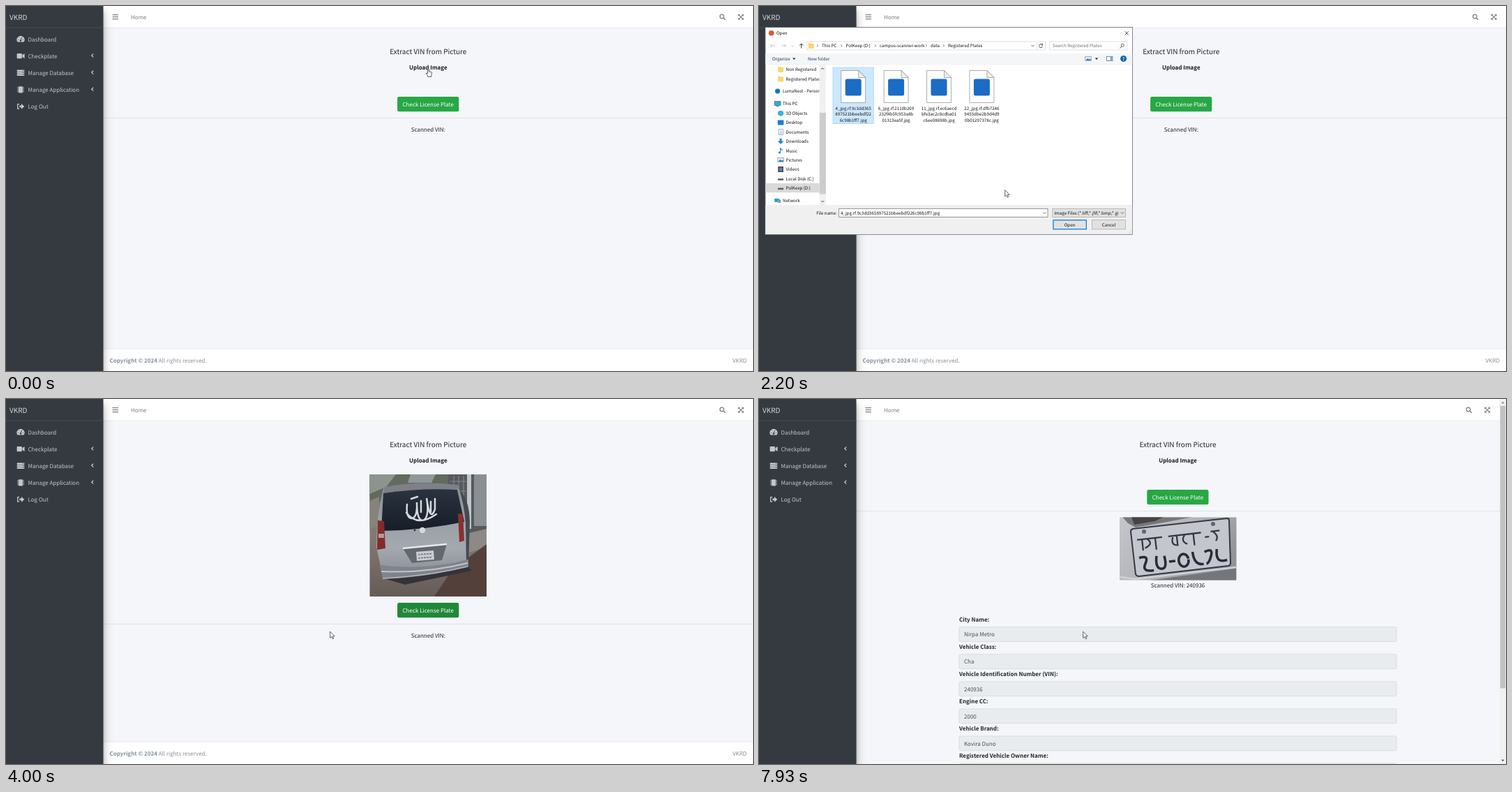
An HTML page that plays this animation: 1071 by 523 pixels, repeating every 8 s.

```html
<!DOCTYPE html>
<html lang="en">
<head>
<meta charset="utf-8">
<title>Plate check</title>
<style>
html, body { margin: 0; width: 100%; height: 100%; overflow: hidden; background: #f4f6f9; }
#stage { display: block; width: 100%; height: 100%; }
text {
  font-family: "Noto Sans CJK JP", "Noto Sans CJK SC", "Noto Sans", sans-serif;
  text-rendering: geometricPrecision;
  white-space: pre;
}
</style>
</head>
<body>
<svg id="stage" viewBox="0 0 1071 523" xmlns="http://www.w3.org/2000/svg"></svg>
<script>
const BRAND = "VKRD", OWNER = "Tahvan Ozrab", PLATE = "240936";
const FRAME = 1000 / 15, LOOP = 8000;

// ---- drawing helpers ----
const text = (x, y, s, { size = 8, fill = "#212529", bold = 400, at = "start" } = {}) =>
  `<text x="${x}" y="${y}" font-size="${size}" fill="${fill}" font-weight="${bold}" text-anchor="${at}">${s}</text>`;
const rect = (x, y, w, h, fill, extra = "") =>
  `<rect x="${x}" y="${y}" width="${w}" height="${h}" fill="${fill}" ${extra}/>`;
const shape = (d, fill, extra = "") => `<path d="${d}" fill="${fill}" ${extra}/>`;
const line = (d, color, w = 1, extra = "") =>
  `<path d="${d}" fill="none" stroke="${color}" stroke-width="${w}" ${extra}/>`;
const disc = (x, y, r, fill, extra = "") => `<circle cx="${x}" cy="${y}" r="${r}" fill="${fill}" ${extra}/>`;
const at = (x, y, s) => `<g transform="translate(${x} ${y})">${s}</g>`;
const crop = (x, y, w, h, s, dx = 0) =>
  `<svg x="${x + dx}" y="${y}" width="${w}" height="${h}" viewBox="${x} ${y} ${w} ${h}">${s}</svg>`;
const chevron = (x, y, color = "#444") => line(`M${x - 2} ${y - 1}l2 2l2 -2`, color, .8);
const button = (x, y, w, label, fill, id = "") =>
  rect(x, y, w, 21.2, fill, `rx="2.2" ${id && `id="${id}"`}`) +
  text(x + w / 2, y + 13.7, label, { fill: "#fff", at: "middle" });
const fade = (id, stops, x2 = 0, y2 = 1) =>
  `<linearGradient id="${id}" x2="${x2}" y2="${y2}">` +
  stops.map((c, i) => `<stop offset="${i / (stops.length - 1)}" stop-color="${c}"/>`).join("") + `</linearGradient>`;

// ---- sidebar ----
const DARK = "#343a40", PALE = "#c2c7d0";
const menu = [
  ["Dashboard", shape("M-4.6 4a5.5 5.5 0 1 1 9.2 0z", PALE) + line("M0 2L1.7 -2.6M-3.6 1h1M-2.3 -2.3l.6 .6M2.7 1h1", DARK, .9) + disc(0, 2, 1.2, DARK)],
  ["Checkplate", rect(-5.4, -3.6, 7.3, 7.2, PALE, 'rx="1"') + shape("M2.4 -1.5L5.6 -3.4V3.4L2.4 1.5z", PALE)],
  ["Manage Database", [-4.3, -1.3, 1.7].map(y => rect(-5.3, y, 10.6, 2.5, PALE, 'rx=".6"') + disc(3.6, y + 1.2, .5, DARK)).join("")],
  ["Manage Application", rect(-2.9, -4.6, 5.8, 9.2, PALE, 'rx=".7"') + line("M-4 -3.6V4M4 -3.6V4", PALE, 1.6, 'stroke-dasharray="1 1"')],
  ["Log Out", shape("M-1.6 -1.3H1V-3.8L5.3 0L1 3.8V1.3H-1.6z", PALE) + line("M-1.8 -3.3H-4.3V3.3H-1.8", PALE, 1.3)]
].map(([label, icon], i) => {
  const y = 47.5 + 24.1 * i;
  return at(21, y, icon) + text(31.5, y + 3.1, label, { fill: PALE }) +
    (i > 0 && i < 4 ? line(`M125.2 ${y - 3}l-2.4 2.4l2.4 2.4`, PALE, 1.3) : "");
}).join("");

const shadow = (y, blur, alpha) => rect(-40, y, 179.5, 720, "#000", `opacity="${alpha}" style="filter:blur(${blur}px)"`);
const sidebar =
  `<g class="scroll">${shadow(7.8, 7.8, .25)}${shadow(5.6, 2.8, .22)}</g>` + rect(0, 0, 139.5, 523, DARK) +
  `<g class="scroll">${text(5, 19.7, BRAND, { size: 10, fill: "#d6d8d9", bold: 300 })}${line("M0 31.2H139.5", "#4b545c", .7)}${menu}</g>`;

// ---- photos ----
const van = crop(521.5, 108, 167.5, 175,
  rect(521, 108, 168, 175, "url(#ground)") +
  rect(521, 108, 120, 40, "#626a5e") + shape("M521 108h38l-14 18l-24 10z", "#8d948d") +
  shape("M580 108h36l-6 12h-34z", "#8f9896") + shape("M521 146l14 -6v40l-14 8z", "#85837b") +
  rect(634, 108, 55, 100, "#565a5e") + rect(661, 108, 6, 78, "#c3c6c8") +
  line("M642 110V150M649 110V160M656 110V165M636 118H660M636 132H660", "#80868a", 1.2) +
  rect(671, 108, 18, 74, "#898f93") +
  shape("M664 192l25 -6v26l-25 8z", "#8c8986") +
  shape("M640 244l49 -36v75h-75z", "#54403a") +
  shape("M538 256l122 -18l8 8l-96 20z", "#35333a") +
  shape("M648 130Q664 140 665 176L663 234L652 240z", "#434a53") +
  shape("M541 128Q590 118 648 124Q657 150 659 178L660 236L541 258L531 212Q531 166 541 128z", "url(#body)") +
  shape("M543 126Q592 117 647 123L649 129L541 136z", "#7d8187") +
  shape("M541 135Q596 127 647 130L657 176Q600 188 538 189z", "url(#glass)") +
  shape("M533 174l9 1l2 39l-12 2z", "#832b2b") + rect(534, 193, 8, 6, "#b59a98") +
  shape("M648 164l7 1l2 38l-7 2z", "#8a302f") +
  line("M575 151Q573 172 583 171Q590 168 589 148Q589 178 600 173Q607 166 603 142Q608 178 615 158V143M574 163Q590 184 617 165M581 143l9 -3M595 146V162M609 147V162", "#d5d9de", 2.5, 'stroke-linecap="round"') +
  disc(597, 188, 4.2, "#d6d9dc") + disc(586, 188, 1.4, "#30343a") +
  shape("M569 214L632 208L625 231L582 235z", "#626770") + line("M569 214L632 208", "#e7e9eb", 2.5) +
  shape("M588 219l25 -2l1 13l-25 2z", "#c9ccd0") + line("M591 223l20 -1.5M591 228l20 -1.5", "#777b82", 1.7, 'stroke-dasharray="3 1"') +
  shape("M536 238Q600 246 663 230V240Q602 256 540 258z", "#7f848c") +
  line("M538 247Q604 250 662 235", "#c1c5c9", 2) + line("M540 257Q604 254 662 240", "#b1b5ba", 1.5), -605.3);

const plate = crop(517, 169.5, 167.5, 90,
  rect(517, 169, 168, 91, "url(#metal)") +
  shape("M521 169H622L580 177L540 184L529 178z", "#77777a") + shape("M534 169h46l-12 6l-30 5z", "#454344") +
  shape("M560 260L684 243V260z", "#74767c") + line("M517 255L540 258L684 241", "#d0d2d6", 2.5) +
  shape("M536 186L671 171Q674 171 674 174L676 235Q676 238 673 239L545 254Q541 254 540 251L533 190Q533 187 536 186z", "#c3c6cd", 'stroke="#353944" stroke-width="2"') +
  disc(552, 190, 3, "#60646c") + disc(651, 179, 3, "#60646c") +
  `<g transform="rotate(-6.5 604 215)">` +
  line("M544 195H580M589 195H636M641 202H647M650 195H663M551 195v16M558 195q10 8 -4 13M570 195v17M596 195q-6 13 5 14V195M613 195q-8 9 2 14M625 195v17M653 195q9 8 3 14", "#343844", 2.3) +
  line("M544 221q15 -3 8 9t11 11M569 221q-4 18 5 19t6 -18M586 231H595M614 231a7 9 0 1 1 -.1 -1M621 221q0 20 14 19M638 223q13 -5 9 6t-8 11M656 221q-5 21 13 17", "#282c37", 3.6) +
  `</g>`, -600.5);

// ---- page ----
const fields = [
  ["City Name:", "Nirpa Metro"], ["Vehicle Class:", "Cha"],
  ["Vehicle Identification Number (VIN):", PLATE], ["Engine CC:", "2000"],
  ["Vehicle Brand:", "Kovira Duno"], ["Registered Vehicle Owner Name:", OWNER],
  ["Registered Vehicle Owner ID:", "c482a917-5e63-41b8-92dc-e7aa4193d06f"]
].map(([label, value], i) => {
  const y = 326.8 + 39.05 * i;
  return text(287, y - 8.1, label, { bold: 700 }) +
    rect(287, y, 627, 20.8, "#e9ecef", 'rx="2" stroke="#ced4da" stroke-width=".7"') +
    text(294, y + 13.6, value, { fill: "#495057" });
}).join("");

const GREY = "#7f7f7f";
const corner = shape("M-4 -4h3.2l-3.2 3.2z", GREY);
const tools =
  at(1027, 15.6, disc(-.6, -.6, 2.8, "none", `stroke="${GREY}" stroke-width="1.3"`) + line("M1.4 1.4L4.2 4.2", GREY, 1.5)) +
  at(1053.6, 15.7, line("M-2.6 -2.6L2.6 2.6M2.6 -2.6L-2.6 2.6", GREY, 1.2) +
    [0, 90, 180, 270].map(a => `<g transform="rotate(${a})">${corner}</g>`).join(""));

const page = `<g class="scroll">` +
  rect(139, 0, 932, 31, "#fff") + line("M139 31.2H1071", "#dee2e6", .7) +
  line("M152.6 12.7H161M152.6 15.7H161M152.6 18.7H161", GREY, 1.3) +
  text(179, 19, "Home", { fill: GREY }) + `<g id="tools">${tools}</g>` +
  `<g id="mid">` +
  text(0, 69.2, "Extract VIN from Picture", { size: 10, at: "middle" }) +
  text(0, 91, "Upload Image", { bold: 700, fill: "#15181b", at: "middle" }) +
  `<g id="photo">${van}</g><g id="plate">${plate}</g>` +
  `<g id="act">${button(-44.2, 130.1, 88.2, "Check License Plate", "#28a745", "check")}${line("M-480 160.5H480", "#dcdee1", .8)}` +
  `<text id="vin" y="179.8" font-size="8" fill="#212529" text-anchor="middle"></text></g></g>` +
  `<g id="form">${fields}${button(287, 598, 120.5, "View Details of " + OWNER, "#28a745")}` +
  button(409.6, 598, 141.4, "Register Incident for " + OWNER, "#dc3545") + `</g>` +
  `<g id="foot">${rect(139, 491, 932, 33, "#fff")}${line("M139 491.3H1071", "#dee2e6", .7)}` +
  text(148.5, 510.6, `<tspan font-weight="700">Copyright © 2024</tspan> All rights reserved.`, { fill: "#869099" }) +
  `<g id="mark">${text(1062, 510.6, BRAND, { fill: "#869099", at: "end" })}</g></g></g>`;

const bar = `<g id="bar">${rect(1061.7, 0, 10, 523, "#f1f1f1")}${rect(1062.7, 10, 7.4, 404.5, "#c1c1c1", 'id="thumb"')}` +
  shape("M1064.2 6.2h4.4l-2.2 -2.4z", "#8a8a8a") + shape("M1064.2 516.8h4.4l-2.2 2.4z", "#505050") + `</g>`;

// ---- file dialog ----
const UI = { size: 6.2, fill: "#111" };
const ui = (x, y, s, o = {}) => text(x, y + 2.4, s, { ...UI, ...o });
const folder = (x, y) => shape(`M${x} ${y - 4}h3l1 1h4v7h-8z`, "#f8d775");
const icons = {
  folder: folder(-4, 0),
  cloud: disc(0, 0, 3.6, "#1473c8"),
  screen: rect(-4.5, -3.5, 9, 6, "#35a4e0", 'stroke="#3c6e91" stroke-width=".6"') + rect(-2, 3, 4, 1, "#567"),
  box: shape("M0 -4L4 -2V2.4L0 4.4L-4 2.4V-2z", "#3fb2d3"),
  desk: rect(-4.3, -3.5, 8.6, 7, "#1b80d2"),
  doc: rect(-3, -4, 6.5, 8, "#fff", 'stroke="#7890a5" stroke-width=".7"') + line("M-1.5 -1.5h3.5M-1.5 .5h3.5M-1.5 2.3h3.5", "#5b8fbd", .6),
  down: shape("M-1.5 -4h3v3.5h2.8L0 4L-4.3 -.5h2.8z", "#1c86e0"),
  note: line("M-.5 3V-4Q1 -1 2.8 -.6", "#1c86e0", 1.1) + disc(-1.7, 2.8, 1.6, "#1c86e0"),
  pic: rect(-4.3, -3, 8.6, 6, "#dfeaf2", 'stroke="#6a8ba3" stroke-width=".6"') + shape("M-3.8 2.6l3 -3l2 1.5l2 -1l.7 2.5z", "#3680b8"),
  film: rect(-3.8, -4, 7.6, 8, "#3f4650") + rect(-2.2, -2.6, 4.4, 5.2, "#6681a8"),
  disk: rect(-4, 0, 8, 2.6, "#5d6266"),
  net: rect(-4.3, -2.6, 6.5, 5, "#3295d2") + disc(2.4, 1, 2.6, "#5dabc9")
};
const tree = [
  [38.5, 91, "folder", "Non Registered"], [38.5, 104.5, "folder", "Registered Plates"],
  [34, 122, "cloud", "LumaNest - Personal"], [34, 140, "screen", "This PC"],
  [38.5, 153.5, "box", "3D Objects"], [38.5, 167, "desk", "Desktop"], [38.5, 180.5, "doc", "Documents"],
  [38.5, 194, "down", "Downloads"], [38.5, 207.2, "note", "Music"], [38.5, 220.5, "pic", "Pictures"],
  [38.5, 234, "film", "Videos"], [38.5, 247.2, "disk", "Local Disk (C:)"],
  [38.5, 260.6, "disk", "PolKeep (D:)"], [34, 278.5, "net", "Network"]
].map(([x, y, k, s]) => at(x - 7.4, y, icons[k]) + ui(x, y, s)).join("");

const names = [
  ["4_jpg.rf.9c3dd365", "897521bbeebdf22", "6c98b1ff7.jpg"],
  ["6_jpg.rf.2110b269", "232f4b5fc953a8b", "01313ea5f.jpg"],
  ["11_jpg.rf.ec6aecd", "bfe3ac2c8cdba01", "c6ee08698b.jpg"],
  ["22_jpg.rf.dfb7246", "9455dbe2b9d4d9", "0b01297378c.jpg"]
];
const cellX = i => 106 + 61.4 * i;
const files = names.map((lines, i) => {
  const x = cellX(i), c = x + 29.2;
  return rect(x, 88, 58.2, 80.6, "none", `class="cell" stroke-width=".7"`) +
    shape(`M${c - 17.5} 92.5h25l10 10v36h-35z`, "#fdfdfd", 'stroke="#8b8b8b" stroke-width=".7"') +
    shape(`M${c + 7.5} 92.5v10h10z`, "#eee", 'stroke="#8b8b8b" stroke-width=".7"') +
    rect(c - 11.5, 104.5, 23, 24, "#1b6cc4", 'rx="2.5"') +
    lines.map((s, n) => ui(c, 146.7 + 8.3 * n, s, { at: "middle" })).join("");
}).join("");

const path = [[90, "This PC"], [124.5, "PolKeep (D:)"], [173, "campus-scanner-work"], [246, "data"], [271, "Registered Plates"]]
  .map(([x, s]) => line(`M${x - 7} 55.3l1.6 1.7l-1.6 1.7`, "#444", .7) + ui(x, 57, s)).join("");
const box = (x, y, w, h, fill, edge, extra = "") => rect(x, y, w, h, fill, `stroke="${edge}" stroke-width=".8" ${extra}`);
const NAVY = { fill: "#1e395b" };

const dialog = `<g id="dialog">` +
  box(9, 30.5, 526.6, 297, "#fff", "#5f646a") + disc(17.7, 38.8, 3.8, "#f1502b") + ui(25, 38.9, "Open") +
  line("M524.6 36.3l5.2 5.2M529.8 36.3l-5.2 5.2", "#222", .8) +
  line("M23 57H16.5M19 54.4L16.4 57L19 59.6M32 57h6.5M36 54.4L38.6 57L36 59.6", "#c2c2c2", .9) + chevron(48, 57, "#c2c2c2") +
  line("M60.7 60.5V54M58 56.6L60.7 53.9L63.4 56.6", "#333", 1) +
  box(69, 51, 341.5, 12, "#fff", "#d9d9d9") + folder(70.8, 57) + path + chevron(392.5, 57) + line("M398.5 51V63", "#d9d9d9", .7) +
  line("M406.2 55.6a2.6 2.6 0 1 0 .4 2M406.5 53.8v2.2h-2.2", "#333", .8) +
  box(416.3, 51, 111.5, 12, "#fff", "#d9d9d9") + ui(421, 57, "Search Registered Plates", { fill: "#6d6d6d" }) +
  disc(521.4, 56.2, 2, "none", 'stroke="#444" stroke-width=".8"') + line("M520 57.8l-2.6 2.6", "#444", 1) +
  rect(9.4, 68, 525.8, 15.5, "#f5f6f7") + line("M9.4 83.7H535", "#e6e8eb", .6) +
  ui(19, 75.4, "Organize", NAVY) + shape("M48 74.4h4.6l-2.3 2.6z", "#1e395b") + ui(70, 75.4, "New folder", NAVY) +
  at(472, 75.3, icons.pic) + shape("M481.7 74.4h4.6l-2.3 2.6z", "#222") +
  box(498.6, 72.3, 8.3, 6.3, "#fff", "#52697f") + rect(503.5, 72.5, 3.2, 6, "#7ea9cc") +
  disc(522.6, 75.4, 4.5, "#0a64ad") + ui(522.6, 75.3, "?", { fill: "#fff", bold: 700, at: "middle" }) +
  rect(9.4, 254, 77.3, 13.3, "#d9d9d9") + crop(9.4, 84, 77.3, 201, tree) +
  rect(86.8, 84, 9, 201, "#f0f0f0") + rect(86.8, 153, 9, 116.5, "#cdcdcd") +
  line("M89.2 90.8l2 -2l2 2M89.2 279l2 2l2 -2", "#444", 1) +
  files + rect(9.4, 285, 525.8, 42.1, "#f0f0f0") +
  ui(112, 296.3, "File name:", { at: "end" }) +
  box(114.6, 290.3, 299.4, 12.2, "#fff", "#0078d7", 'id="field"') + chevron(409.3, 296.5) +
  line("M117 292.3V300.6", "#000", .7, 'id="caret"') + `<g id="chosen">${ui(117, 296.3, names[0].join(""))}</g>` +
  box(420.8, 290.3, 104.8, 12.2, "#e1e1e1", "#adadad") +
  crop(421, 290, 94.5, 13, ui(423.3, 296.3, "Image Files (*.tiff;*.jfif;*.bmp;*.gif")) + chevron(521, 296.5) +
  box(421.9, 306.8, 47.4, 13, "#e1e1e1", "#0078d7", 'id="open" style="stroke-width:1.2"') + ui(445.6, 313.2, "Open", { at: "middle" }) +
  box(477.5, 306.6, 48, 13.3, "#e1e1e1", "#adadad") + ui(501.5, 313.2, "Cancel", { at: "middle" }) +
  line("M534 322l-4.5 4.5M534 324.5l-2 2", "#b5b5b5", .8, 'stroke-dasharray="1 1"') + `</g>`;

const cursor = `<g id="cursor">` +
  shape("M0 0V9.2L2.1 7.3L3.6 10.6L5.1 9.9L3.7 6.7H6.5z", "#fff", 'id="arrow" stroke="#111" stroke-width=".65"') +
  shape("M-1 .8Q0 -.5 1 .8V4.3L4.1 5Q5.2 5.3 5 6.6L4.2 9.6V11.6H-.9V10.2L-3.2 7.2Q-3.3 5.6 -1 6.9z", "#fff", 'id="hand" stroke="#111" stroke-width=".7"') + `</g>`;

const defs = `<defs>` +
  fade("metal", ["#c4c6cb", "#b4b6bb", "#92949a"], 1, .5) +
  fade("ground", ["#6d7069", "#837a74", "#655c57"]) +
  fade("body", ["#8d9299", "#989da5", "#a4a9b0", "#878c94"]) +
  fade("glass", ["#2b3340", "#171d28"]) + `</defs>`;

const $ = id => document.getElementById(id);
$("stage").innerHTML = defs + rect(0, 0, 1071, 523, "#f4f6f9") + page + sidebar + bar + dialog + cursor;

// ---- motion ----
const track = [ // ms, x, y
  [0, 605.6, 89.7], [533, 605.6, 89.7], [733, 612.5, 85.6], [867, 612.5, 85.6], [1200, 430, 102],
  [1467, 221, 125.7], [1733, 140, 122], [1867, 140, 122], [2133, 300, 232], [2333, 456, 326],
  [2600, 443.3, 315.2], [3000, 443.3, 315.2], [3333, 585, 304], [3533, 606, 302],
  [3667, 604, 304], [3867, 527, 327], [3933, 486, 331.8], [4000, 464.7, 333.2], [LOOP, 464.7, 333.2]
];
function pointer(t) {
  const i = Math.max(1, track.findIndex(k => k[0] >= t));
  const [t0, x0, y0] = track[i - 1], [t1, x1, y1] = track[i];
  const p = (t - t0) / (t1 - t0);
  return [x0 + (x1 - x0) * p, y0 + (y1 - y0) * p];
}
const inside = ([px, py], x, y, w, h) => px >= x && px <= x + w && py >= y && py <= y + h;
const show = (id, on) => { $(id).style.display = on ? "" : "none"; };
const move = (id, x, y) => $(id).setAttribute("transform", `translate(${x} ${y})`);
const cells = document.querySelectorAll(".cell"), scrolled = document.querySelectorAll(".scroll");

function draw(ms) {
  const step = Math.floor((ms + 5) / FRAME), t = Math.min(step * FRAME + .5, LOOP);
  const pos = pointer(t), late = pointer(Math.max(0, t - FRAME));
  const opened = t >= 933 && t < 2733, picked = t >= 1800;
  const loaded = t >= 2800 && t < 6266, done = t >= 6266;
  const scroll = t >= 6933 && t < 7000 ? 78 : t >= 7000 && t < 7933 ? 127.9 : 0;

  scrolled.forEach(g => g.setAttribute("transform", `translate(0 ${-scroll})`));
  move("mid", done ? 600.5 : 605.3, 0);
  move("act", 0, loaded ? 161.9 : 0);
  move("tools", done ? -9.4 : 0, 0);
  move("mark", done ? -9.4 : 0, 0);
  move("foot", 0, done ? 127.9 : 0);
  show("photo", loaded);
  show("plate", done);
  show("form", done);
  show("bar", done);
  $("thumb").setAttribute("y", 10 + scroll * .77);
  $("vin").textContent = done ? "Scanned VIN: " + PLATE : "Scanned VIN:";
  $("vin").setAttribute("y", done ? 269.8 : 179.8);

  const onCheck = loaded && inside(pos, 561, 292, 88, 21.5);
  $("check").setAttribute("fill", onCheck || (loaded && t > 3533) ? "#218838" : "#28a745");

  show("dialog", opened);
  $("dialog").style.opacity = t < 1000 ? .6 : t >= 2666 ? .4 : 1;
  cells.forEach((c, i) => {
    const hover = inside(late, cellX(i), 88, 58.2, 80.6), sel = picked && i === 0;
    c.setAttribute("fill", sel ? "#cce8ff" : hover ? "#e5f3ff" : "none");
    c.setAttribute("stroke", sel ? "#99d1ff" : "none");
  });
  show("caret", !picked);
  show("chosen", picked);
  $("field").setAttribute("stroke", picked ? "#7a7a7a" : "#0078d7");
  $("open").setAttribute("fill", inside(pos, 421.9, 306.8, 47.4, 13) ? "#e5f1fb" : "#e1e1e1");

  const hand = t < 933 || onCheck;
  show("hand", hand);
  show("arrow", !hand);
  move("cursor", pos[0], pos[1]);
}
function tick() {
  draw(performance.now() % LOOP);
  requestAnimationFrame(tick);
}
tick();
</script>
</body>
</html>
```
